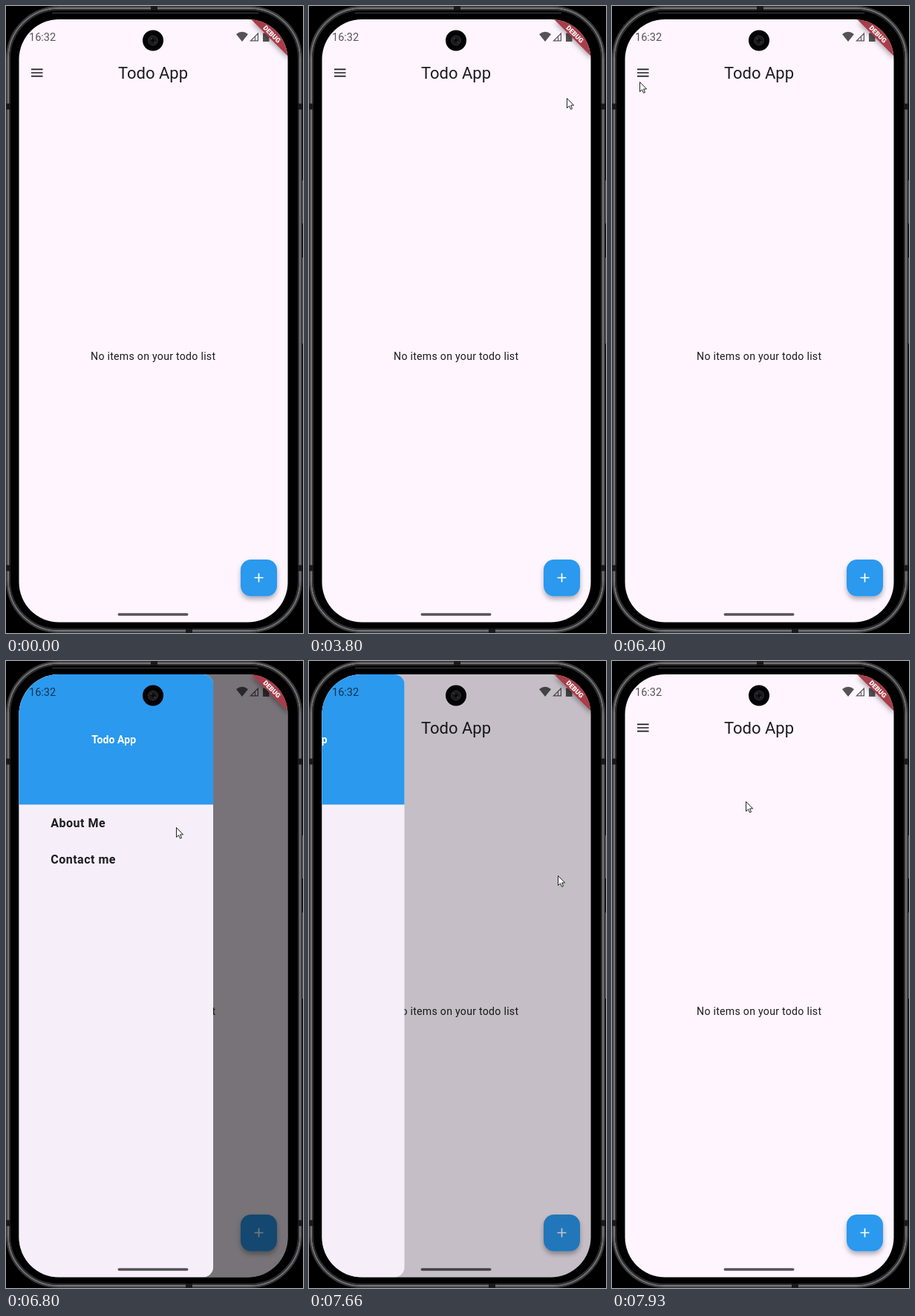
Write an HTML page that moves like this. It is 400 px wide and 845 px high and loops after 8 s.

```html
<!DOCTYPE html>
<html lang="en">
<head>
<meta charset="utf-8">
<title>Todo App</title>
<style>
  html, body { margin: 0; height: 100%; overflow: hidden; background: #000; }
  svg { display: block; width: 400px; height: 845px; font-family: Roboto, sans-serif; }
  .ink { fill: #1d1b20; }
  .mid { text-anchor: middle; }
</style>
</head>
<body>
<svg viewBox="0 0 400 845">
  <defs>
    <clipPath id="screen"><rect x="17.5" y="18" width="362" height="812.5" rx="54"/></clipPath>
    <clipPath id="panel"><rect x="-20" y="18" width="288" height="812.5" rx="14"/></clipPath>
    <filter id="shadow" x="-30%" y="-30%" width="160%" height="170%">
      <feDropShadow dx="0" dy="4" stdDeviation="3" flood-opacity=".3"/>
    </filter>
  </defs>

  <!-- phone body -->
  <g fill="none">
    <rect x="1" y="1" width="397" height="843" rx="70" stroke="#3c3c3e" stroke-width="2"/>
    <rect x="3" y="3" width="393" height="839" rx="68" stroke="#77777a" stroke-width="2"/>
    <rect x="5" y="5" width="389" height="835" rx="66" stroke="#303032" stroke-width="2"/>
    <path d="M62 9.5H340" stroke="#29292b" stroke-width="2"/>
    <path d="M0 135.5H6M0 757.5H6M393 135.5H399M393 757.5H399" stroke="#19191b" stroke-width="8"/>
    <path d="M199.500 0V6M246.500 839V845" stroke="#19191b" stroke-width="9"/>
    <path d="M399.500 235V293M399.500 339V455" stroke="#4a4a4c" stroke-width="2"/>
  </g>

  <g clip-path="url(#screen)">
    <rect width="400" height="845" fill="#fef5ff"/>
    <path d="M34 85.300H49.500M34 90H49.500M34 94.700H49.500" stroke="#1d1b20" stroke-width="1.700"/>
    <text class="ink mid" x="198" y="98" font-size="22">Todo App</text>
    <text class="ink mid" x="198.200" y="477" font-size="14.100" letter-spacing=".28">No items on your todo list</text>
    <rect x="316" y="746" width="49" height="49.500" rx="14" fill="#2b99ee" filter="url(#shadow)"/>
    <path d="M334.500 770.500H346.500M340.500 764.500V776.500" stroke="#fff" stroke-width="1.700"/>

    <rect id="scrim" width="400" height="845"/>
    <g id="drawer">
      <g clip-path="url(#panel)">
        <rect x="-20" y="18" width="288" height="813" fill="#f6effa"/>
        <rect x="-20" y="18" width="288" height="175.500" fill="#2b99ee"/>
      </g>
      <text class="mid" x="134" y="110.500" font-size="14" font-weight="700" letter-spacing=".1" fill="#fff">Todo App</text>
      <g class="ink" font-size="16" font-weight="700" letter-spacing=".5">
        <text x="49" y="223.500">About Me</text>
        <text x="49" y="273">Contact me</text>
      </g>
    </g>

    <!-- system bars -->
    <g fill="#000" fill-opacity=".66">
      <text x="31" y="46.500" font-size="14.500">16:32</text>
      <path d="M310 38Q318 31.500 326 38L318 48Z"/>
      <path d="M328 47.500L340 35.500V47.500ZM331 46.300H335V42.300ZM336 46.300H338.800V38.400L336 41.200Z" fill-rule="evenodd"/>
      <path d="M346 36.500H348.500V35H352V36.500H354.500V48H346Z"/>
      <rect x="150.500" y="818.300" width="95" height="3.500" rx="1.750"/>
    </g>
    <path d="M330 18H353L380 45V68Z" fill="#a93e4a" filter="url(#shadow)"/>
    <text class="mid" transform="translate(358 38) rotate(45)" y="3.100" font-size="9" font-weight="900" fill="#fff">DEBUG</text>
    <circle cx="198" cy="46.500" r="14" fill="#030304"/>
    <circle cx="198" cy="46.500" r="6.500" fill="#1b1b1e" stroke="#303034"/>
    <circle cx="198" cy="46.500" r="2.500" fill="#09090b"/>
    <path d="M194.500 43L196.500 45M199.500 48L201.500 50" stroke="#55555b"/>

    <path id="cursor" d="M.5 .5V13.500L3.500 10.700L5.500 15.200L7.500 14.300L5.600 9.900H9.600Z" fill="#fff" stroke="#222" stroke-linejoin="round"/>
  </g>
</svg>
<script>
const LOOP = 8000, TICK = 1000 / 15, DRAWER_WIDTH = 268;
const OPEN_AT = 6470, CLOSE_AT = 7554;
const [scrim, drawer, cursor] = ['scrim', 'drawer', 'cursor'].map(id => document.getElementById(id));

// time, x, y of the pointer's tip
const path = [
  [60, 38, 300], [460, 300, 190], [800, 300, 190], [1200, 342, 126], [1790, 342, 126],
  [1930, 349, 113], [3590, 349, 113], [3800, 347, 124], [4260, 338, 140], [5860, 338, 140],
  [6060, 45, 116], [6200, 45, 116], [6400, 37, 102], [6540, 37, 102], [6930, 325, 285],
  [7400, 325, 285], [7530, 335, 289], [7740, 335, 289], [7930, 180, 189], [8000, 180, 189]
];

function pointerAt(t) {
  const i = path.findIndex(key => key[0] > t);
  const [t0, x0, y0] = path[i - 1], [t1, x1, y1] = path[i];
  const k = (t - t0) / (t1 - t0);
  return [x0 + (x1 - x0) * k, y0 + (y1 - y0) * k];
}

// Critically damped spring, falling from 1 to 0
function spring(ms) {
  const s = Math.max(0, ms) * 0.0174;
  const rest = (1 + s) * Math.exp(-s);
  return rest < 0.02 ? 0 : rest;
}

function draw(now) {
  const t = Math.floor((now % LOOP + 7) / TICK) * TICK % LOOP;
  const open = t < CLOSE_AT ? 1 - spring(t - OPEN_AT) : spring(t - CLOSE_AT);
  scrim.setAttribute('opacity', 0.54 * open);
  drawer.setAttribute('visibility', open ? 'visible' : 'hidden');
  drawer.setAttribute('transform', `translate(${17 + DRAWER_WIDTH * (open - 1)})`);

  const shown = t >= path[0][0];
  cursor.setAttribute('visibility', shown ? 'visible' : 'hidden');
  if (shown) cursor.setAttribute('transform', `translate(${pointerAt(t).map(Math.round)})`);
}

const start = performance.now();
(function frame() {
  draw(performance.now() - start);
  requestAnimationFrame(frame);
})();
</script>
</body>
</html>
```
